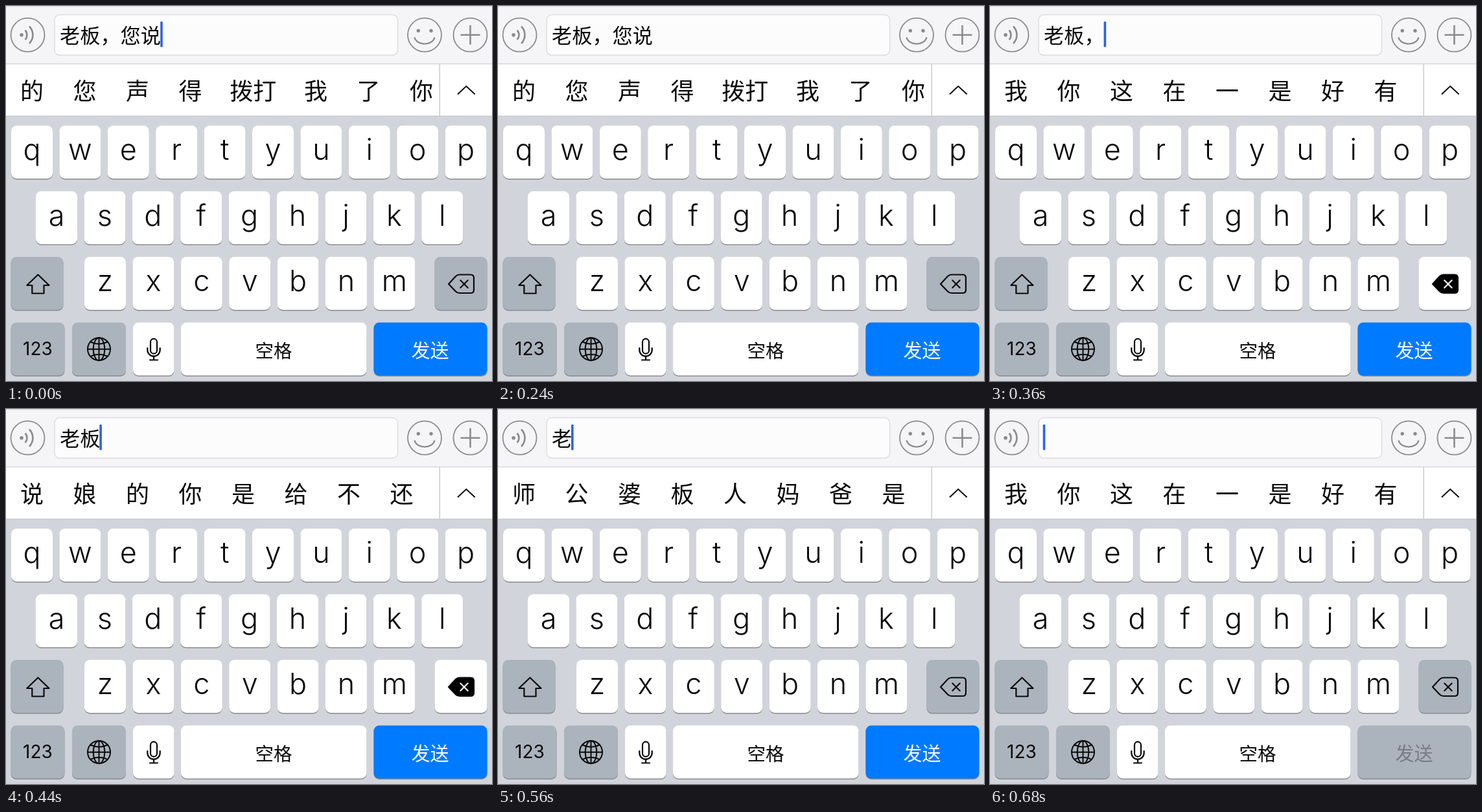
These frames come from a looping animation (750x580 px, 0.72 s). An HTML page:

```html
<!DOCTYPE html>
<html lang="zh-CN">
<head>
<meta charset="utf-8">
<title>Keyboard</title>
<style>
  html, body { margin: 0; width: 100%; height: 100%; overflow: hidden; background: #d1d5db; }
  svg { display: block; width: 750px; height: 580px; }
  text { font-family: "Noto Sans CJK SC", "Noto Sans CJK", sans-serif; fill: #0a0a0a; text-anchor: middle; }
  .latin { font-family: Inter, Roboto, sans-serif; }
  .letter { font-size: 45px; font-weight: 300; }
  .line { fill: none; stroke: #0a0a0a; stroke-width: 2.2; stroke-linejoin: round; stroke-linecap: round; }
  .gray { fill: none; stroke: #8b8b8e; stroke-width: 1.8; }
  .dot { fill: #8b8b8e; stroke: none; }
</style>
</head>
<body>
<svg viewBox="0 0 750 580">
  <defs>
    <clipPath id="bar"><rect y="90" width="669" height="80"/></clipPath>
  </defs>

  <rect width="750" height="580" fill="#d1d5db"/>
  <rect width="750" height="90" fill="#f5f5f7"/>
  <rect width="750" height="1.5" fill="#dfdfe1"/>
  <rect x="75" y="13.5" width="529.5" height="62.5" rx="8" fill="#fcfcfd" stroke="#dedee1" stroke-width="1.5"/>
  <rect y="90" width="750" height="80" fill="#fff"/>
  <rect y="88.8" width="750" height="1.4" fill="#d4d4d7"/>
  <rect y="169.6" width="750" height="1.4" fill="#c6cacf"/>
  <rect x="668.5" y="90" width="1.5" height="80" fill="#c8cacd"/>
  <path class="line" d="M697 136.5 L710.3 124 L723.6 136.5" style="stroke-width:2;stroke-linecap:butt;stroke-linejoin:miter"/>

  <g class="gray">
    <circle cx="33.5" cy="44.7" r="26"/>
    <circle cx="646" cy="44.7" r="26"/>
    <circle cx="716.5" cy="44.7" r="26"/>
    <circle class="dot" cx="24" cy="44.7" r="2.8"/>
    <path d="M29.5 37.5 A10.5 10.5 0 0 1 29.5 52 M36 31.5 A19 19 0 0 1 36 58" stroke-width="2.6"/>
    <circle class="dot" cx="636.3" cy="38.3" r="2.7"/>
    <circle class="dot" cx="656" cy="38.3" r="2.7"/>
    <path d="M630.5 48.5 C634 62 658 62 661.5 48.5" stroke-width="2.4"/>
    <path d="M701.5 44.7 H731.5 M716.5 29.7 V59.7" stroke-width="2.6"/>
  </g>

  <text id="typed" x="83" y="56.8" font-size="31.2" style="text-anchor:start"></text>
  <rect id="caret" y="24" width="3.6" height="39.5" rx="1.2" fill="#2a64e8"/>
  <g id="words" clip-path="url(#bar)" font-size="36"></g>
  <g id="keys"></g>

  <path class="line" d="M49.4 415.5 L66.5 432 H58.5 V444.5 H40.3 V432 H32.3 Z"/>
  <g id="erase" class="line">
    <path d="M683 430 L694 418 Q696.5 415.5 700 415.5 H717 Q722 415.5 722 420.5 V439 Q722 444 717 444 H700 Q696.5 444 694 441.5 Z"/>
    <path id="cross" d="M701.3 424.3 L712.7 435.7 M712.7 424.3 L701.3 435.7"/>
  </g>
  <g class="line" style="stroke-width:2">
    <circle cx="143.5" cy="530.7" r="17.5"/>
    <ellipse cx="143.5" cy="530.7" rx="8.8" ry="17.5"/>
    <path d="M143.5 513.2 V548.2 M126 530.7 H161 M130.3 519.5 Q143.5 526 156.7 519.5 M130.3 541.9 Q143.5 535.4 156.7 541.9"/>
  </g>
  <g class="line">
    <rect x="223" y="514.7" width="10" height="23" rx="5"/>
    <path d="M218.3 529 V532 A9.7 9.7 0 0 0 237.7 532 V529 M228 542 V547 M222 547.5 H234"/>
  </g>
  <text class="latin" x="49" y="540.2" font-size="28">123</text>
  <text x="413" y="543.6" font-size="28.5">空格</text>
  <text id="sendText" x="654.5" y="543.8" font-size="29">发送</text>
</svg>
<script>
  const NS = "http://www.w3.org/2000/svg";
  const $ = id => document.getElementById(id);

  function add(parent, tag, attrs, text) {
    const el = document.createElementNS(NS, tag);
    for (const name in attrs) el.setAttribute(name, attrs[name]);
    if (text) el.textContent = text;
    parent.append(el);
    return el;
  }

  const ROW = 101.5, PITCH = 74.4, DARK = "#abb3bd";

  // Returns the key's face so that its colour can change.
  function key(x, row, w, fill) {
    const y = 185 + row * ROW;
    const box = { x, width: w, height: 82, rx: 8.5 };
    add($("keys"), "rect", { ...box, y: y + 1.6, fill: "#888b90" });
    return add($("keys"), "rect", { ...box, y, fill });
  }

  function letters(chars, x, row) {
    [...chars].forEach((c, i) => {
      const left = x + i * PITCH;
      key(left, row, 64, "#fff");
      add($("keys"), "text", { class: "latin letter", x: left + 32, y: 238.3 + row * ROW }, c);
    });
  }

  letters("qwertyuiop", 8, 0);
  letters("asdfghjkl", 46, 1);
  letters("zxcvbnm", 121, 2);
  key(7.5, 2, 81, DARK);
  const eraseKey = key(661.5, 2, 81, DARK);
  key(7.5, 3, 83, DARK);
  key(102, 3, 83, DARK);
  key(196, 3, 63.5, "#fff");
  key(270, 3, 286.5, "#fff");
  const sendKey = key(567.5, 3, 175, "#007aff");

  const PHRASE = "老板，您说";
  const START = "我 你 这 在 一 是 好 有";
  // Suggestions by number of characters left in the field
  const SUGGEST = [
    START,
    "师 公 婆 板 人 妈 爸 是",
    "说 娘 的 你 是 给 不 还",
    START,
    "的 可以 获得 好 是 获得的 还",
    "的 您 声 得 拨打 我 了 你"
  ];
  const lists = SUGGEST.map(list => {
    const g = add($("words"), "g", {});
    let x = -0.8;
    for (const word of list.split(" ")) {
      const w = Math.max(81.5, 36 * word.length + 40);
      add(g, "text", { x: x + w / 2, y: 144.6 }, word);
      x += w;
    }
    return g;
  });

  // [time, characters left, erase key held]
  const STEPS = [
    [0, 5, 0], [280, 4, 1], [320, 4, 0], [360, 3, 1], [400, 3, 0],
    [440, 2, 1], [480, 1, 1], [520, 1, 0], [600, 0, 1], [640, 0, 0]
  ];
  const LOOP = 720;
  let shown;

  function show(step) {
    if (step === shown) return;
    shown = step;
    const [, left, held] = step;
    $("typed").textContent = PHRASE.slice(0, left);
    $("caret").setAttribute("x", 81.7 + 31.3 * left);
    lists.forEach((g, i) => g.style.display = i === left ? "" : "none");
    eraseKey.setAttribute("fill", held ? "#fff" : DARK);
    $("erase").style.fill = held ? "#000" : "none";
    $("cross").style.stroke = held ? "#fff" : "#0a0a0a";
    sendKey.setAttribute("fill", left ? "#007aff" : DARK);
    $("sendText").style.fill = left ? "#fff" : "#777e86";
  }

  function draw(now) {
    const t = now % LOOP;
    show(STEPS.findLast(step => step[0] <= t));
    // The caret blinks out once before erasing begins.
    $("caret").style.opacity = t < 280 ? Math.min(1, Math.max(0, (200 - t) / 80)) : 1;
    requestAnimationFrame(draw);
  }

  const begin = performance.now();
  draw(0);
  function tick() { draw(Math.max(0, performance.now() - begin)); }
  draw = (base => function () {
    base(Math.max(0, performance.now() - begin));
  })(draw);
</script>
</body>
</html>
```
